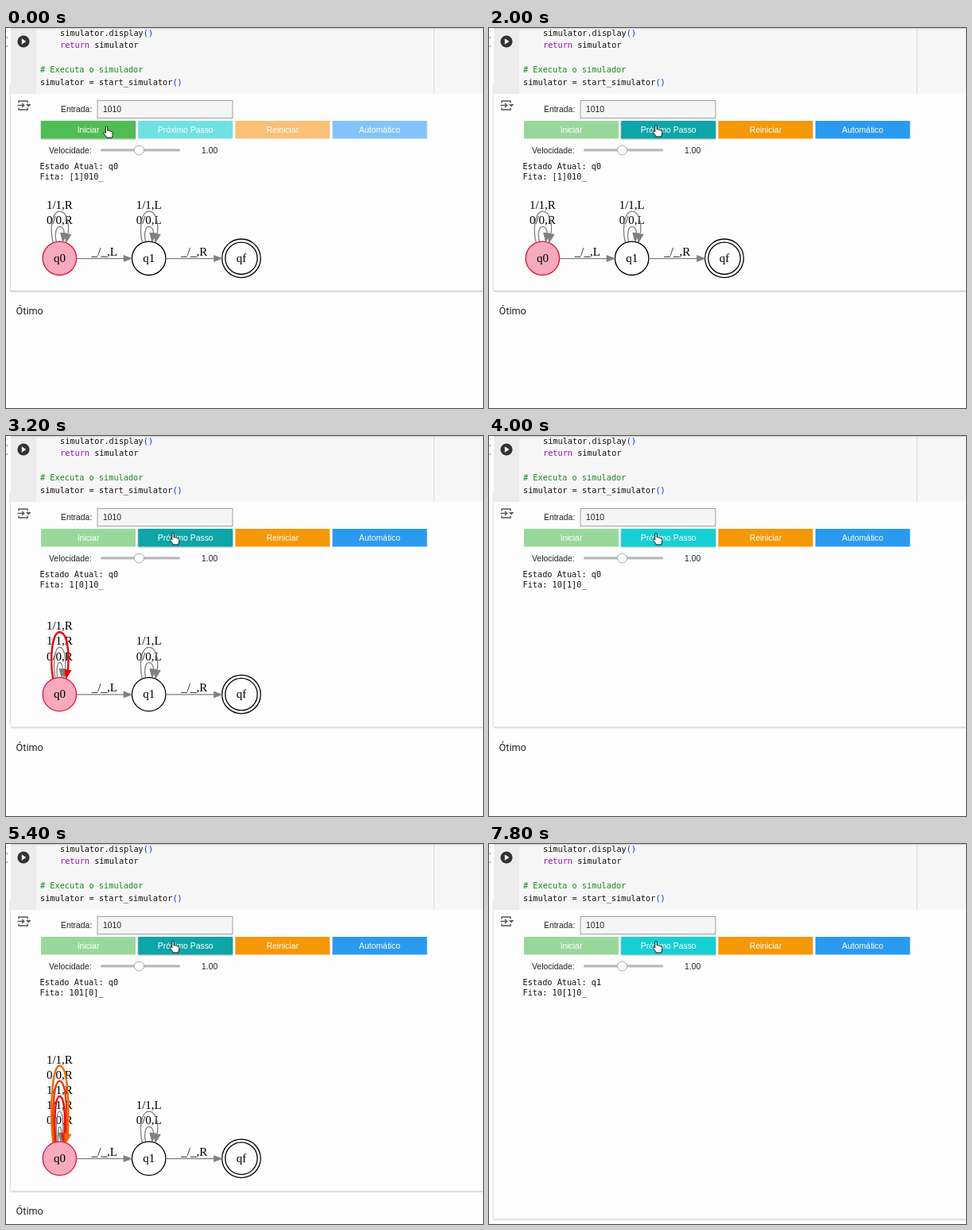
An HTML page that plays this animation: 600x479 px, repeating every 8000 ms.

```html
<!DOCTYPE html>
<html lang="pt">
<head>
<meta charset="utf-8">
<style>
html, body { margin: 0; width: 100%; height: 100%; overflow: hidden; background: #fefefe; }
svg { display: block; width: 600px; height: 479px; }
text { white-space: pre; }
.ui { font: 10.4px "Liberation Sans", Arial, sans-serif; fill: #222; }
.mono { font: 10.24px "DejaVu Sans Mono", monospace; fill: #111; }
.graph { font: 15px "Liberation Serif", Times, serif; text-anchor: middle; }
.note { font: 12.7px Roboto, sans-serif; fill: #222; }
.paren { fill: #0431fa; }
.button { text-anchor: middle; fill: #fff; }
</style>
</head>
<body>
<svg viewBox="0 0 600 479">
  <defs>
    <filter id="soft" x="-5%" y="-5%" width="110%" height="110%">
      <feDropShadow dx="0" dy=".8" stdDeviation="1.2" flood-opacity=".35"/>
    </filter>
  </defs>
  <rect id="panel" x="6" y="70" width="620" fill="#fefdfe" filter="url(#soft)"/>
  <rect x="6" width="594" height="83" fill="#f6f6f7"/>
  <rect x="6" width="32" height="83" fill="#ececed"/>
  <path d="M538.5 0V83" stroke="#dedee0"/>
  <path d="M6 .5H600" stroke="#d2d2d4" stroke-width="1.5"/>
  <path d="M0 11l2 2M0 24l2-2" stroke="#777"/>
  <circle cx="22" cy="17" r="7.6" fill="#333"/>
  <path d="M19.8 13.2v7.6l5.6-3.8z" fill="#fff"/>
  <g class="mono">
    <text x="68" y="10">simulator.display<tspan class="paren">()</tspan></text>
    <text x="68" y="25"><tspan fill="#a000c8">return</tspan> simulator</text>
    <text x="43" y="56" fill="#008000" style="fill:#128a12"># Executa o simulador</text>
    <text x="43" y="71.5">simulator = start_simulator<tspan class="paren">()</tspan></text>
  </g>
  <g fill="none" stroke="#555" stroke-width="1.4">
    <path d="M16 94.500V92h11v2.500M16 100.500V103h11v-2.500M14.500 97.500h8M20 95l2.700 2.500L20 100"/>
    <path d="M25 96h6.500l-3.200 3.600z" fill="#555" stroke="none"/>
  </g>
  <rect x="115" y="91.500" width="170" height="22" fill="#f5f5f6" stroke="#a0a0a4"/>
  <g class="ui">
    <text x="69" y="106">Entrada:</text>
    <text x="122" y="106">1010</text>
    <text x="54" y="157.500">Velocidade:</text>
    <text x="246" y="157.500">1.00</text>
  </g>
  <rect x="119" y="152.200" width="100" height="3.400" rx="1.500" fill="#b9b9bb"/>
  <circle cx="167.500" cy="154" r="6" fill="#fff" stroke="#a8a8aa"/>
  <g id="buttons" class="ui"></g>
  <g class="mono">
    <text id="state" x="42.500" y="177.500"></text>
    <text id="tape" x="42.500" y="191"></text>
  </g>
  <g id="graph" class="graph"></g>
  <text id="note" class="note" x="12.500">Ótimo</text>
  <path id="hand" d="M-1.200 1.200C-1.200-.4 1.200-.4 1.200 1.200V5.500C1.800 4.600 3.300 4.800 3.500 6 4.300 5.200 5.600 5.700 5.700 6.800 6.600 6.200 7.800 6.800 7.800 8V10.500C7.800 12.200 6.600 13 6.600 14.500H.2C0 12.800-1.800 11.500-3.600 9-4.400 7.600-2.800 6.700-1.200 8.400Z"
    fill="#fff" stroke="#111"/>
</svg>
<script>
const LOOP = 8000, STEP = 35.35, GREY = '#808080';
const $ = id => document.getElementById(id);

// Each entry changes part of the scene from its time onwards.
const timeline = [
  [0, { state: 'q0', tape: '[1]010_', steps: 0, shown: true, ready: false, next: 'idle', hand: [126.5, 124] }],
  [600, { ready: true }],
  [1000, { hand: [133, 124] }],
  [1200, { hand: [150, 124] }],
  [1600, { hand: [178, 123] }],
  [1800, { hand: [210, 122.500], next: 'hover' }],
  [2000, { next: 'down' }],
  [2600, { shown: false }],
  [2800, { tape: '1[0]10_' }],
  [3200, { shown: true, steps: 1 }],
  [3600, { shown: false, next: 'hover' }],
  [4000, { tape: '10[1]0_' }],
  [4800, { shown: true, steps: 2 }],
  [5000, { shown: false, next: 'down' }],
  [5200, { tape: '101[0]_' }],
  [5400, { shown: true, steps: 3 }],
  [5600, { shown: false, next: 'hover' }],
  [6000, { tape: '1010[_]' }],
  [6600, { shown: true, steps: 4, next: 'down' }],
  [6800, { shown: false, next: 'hover' }],
  [7000, { state: 'q1', tape: '101[0]_' }],
  [7800, { tape: '10[1]0_' }]
];

const text = (x, y, s, extra = '') => `<text x="${x}" y="${y}" ${extra}>${s}</text>`;
const circle = (x, y, r, fill = '#fff', stroke = '#000') =>
  `<circle cx="${x}" cy="${y}" r="${r}" fill="${fill}" stroke="${stroke}" stroke-width="1.3"/>`;

function button(i, label, fill, raised) {
  const x = 44 + 122.2 * i;
  return `<rect x="${x}" y="117" width="119" height="22.500" fill="${fill}" ${raised ? 'filter="url(#soft)"' : ''}/>`
    + text(x + 59.5, 132, label, 'class="button"');
}

function buttons({ ready, next }) {
  const nextFill = { idle: ready ? '#12c4c8' : '#70e1e2', hover: '#13cfd4', down: '#10a5a7' }[next];
  return button(0, 'Iniciar', ready ? '#98d99b' : '#50bd53', !ready)
    + button(1, 'Próximo Passo', nextFill, next != 'idle')
    + button(2, 'Reiniciar', ready ? '#f59808' : '#f9c077', false)
    + button(3, 'Automático', ready ? '#2a9af0' : '#82c4f9', false);
}

// Self loop number k of n, drawn above a node, with its label.
function loop(x, y, k, n, label) {
  const w = 11 * (k + 1) / n, top = -40 - 19.2 * k, h = -20 - top;
  const color = k < 2 ? GREY : `hsl(${13 * (k - 2)} 94% 48%)`;
  const tip = .75 * w, edge = -Math.sqrt(462 - tip * tip);
  const baseX = tip + .2 * w, baseY = edge - 11;
  const line = `M${-tip} ${edge}C${-1.15 * w} ${edge - .45 * h} ${-w * .85} ${top} 0 ${top}`
    + `S${1.15 * w} ${edge - .6 * h} ${baseX} ${baseY}`;
  return `<g transform="translate(${x} ${y})">
    <path d="${line}" fill="none" stroke="${color}" stroke-width="${k < 2 ? 1.3 : 2.4}"/>
    <path d="M${tip} ${edge}L${baseX - 4} ${baseY}L${baseX + 4} ${baseY + .8}z" fill="${color}" stroke="${color}"/></g>`
    + text(x, y - 43 - 19.2 * k, label);
}

function edge(x1, x2, y, label) {
  return `<path d="M${x1} ${y}H${x2 - 10}" stroke="${GREY}" stroke-width="1.3"/>
    <path d="M${x2} ${y}l-10.500-4v8z" fill="${GREY}" stroke="${GREY}" stroke-width=".6"/>`
    + text((x1 + x2) / 2 + .2, y - 3.5, label);
}

function graph(steps) {
  const y = 290.3 + STEP * steps, n = steps + 2;
  let out = circle(67.4, y, 21.2, '#f7a9bd', '#e01436') + circle(179.7, y, 21.2)
    + circle(296, y, 24.3) + circle(296, y, 20.2);
  for (let k = 0; k < 2; k++) out += loop(179.7, y, k, 2, `${k}/${k},L`);
  for (let k = 0; k < n; k++) {
    const bit = k < 2 ? k : (k + 1) % 2;
    out += loop(67.4, y, k, n, `${bit}/${bit},R`);
  }
  out += edge(88.8, 158.5, y + .3, '_/_,L') + edge(201, 272, y + .3, '_/_,R');
  return out + text(67.4, y + 4.2, 'q0') + text(179.7, y + 4.2, 'q1') + text(296, y + 4.2, 'qf');
}

function draw(s) {
  $('panel').setAttribute('height', 261 + STEP * s.steps);
  $('note').setAttribute('y', 361.3 + STEP * s.steps);
  $('hand').setAttribute('transform', `translate(${s.hand})`);
  $('state').textContent = 'Estado Atual: ' + s.state;
  $('tape').textContent = 'Fita: ' + s.tape;
  $('buttons').innerHTML = buttons(s);
  $('graph').innerHTML = s.shown ? graph(s.steps) : '';
}

let last = 0;
function frame(now) {
  const past = timeline.filter(([at]) => at <= now % LOOP);
  if (past.length != last) {
    last = past.length;
    draw(Object.assign({}, ...past.map(p => p[1])));
  }
  requestAnimationFrame(frame);
}
frame(performance.now());
</script>
</body>
</html>
```
